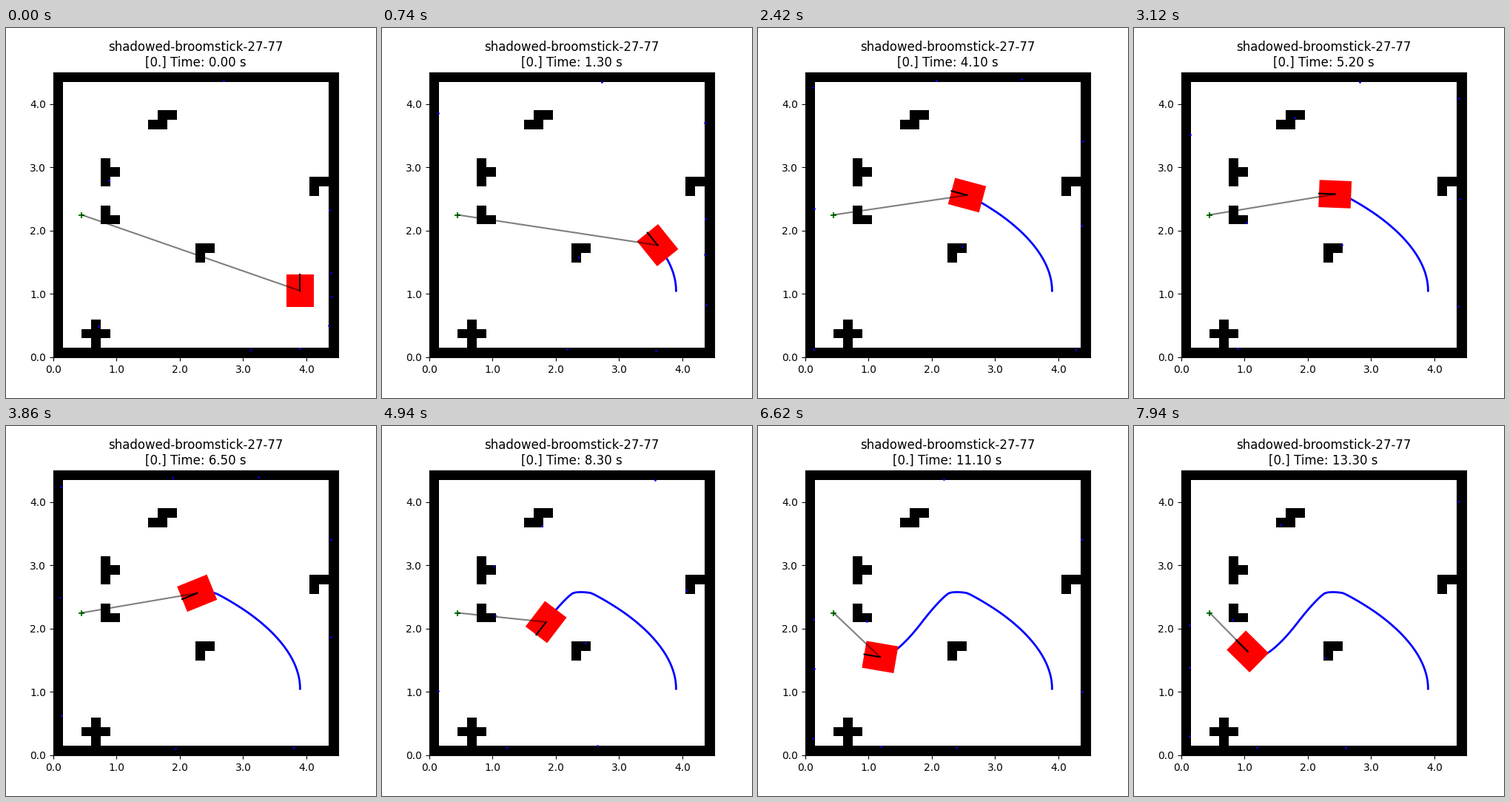
A matplotlib script for the animation above (8 s loop, 500x500 px).

```python
import numpy as np
import matplotlib.pyplot as plt
from matplotlib.animation import FuncAnimation

CELL, N = 0.15, 30
SIZE = CELL * N
GOAL = np.array([0.45, 2.25])
LENGTH, WIDTH = 0.508, 0.43
DT, STEPS = 0.1, 134

# key poses: time, x, y, heading in degrees, speed
POSES = np.array([
    (0.0, 3.90, 1.05, 90, 0.62),
    (2.5, 3.10, 2.238, 144.3, 0.50),
    (4.1, 2.557, 2.561, 165, 0.08),
    (6.5, 2.273, 2.561, 202, 0.09),
    (8.3, 1.846, 2.105, 232.6, 0.55),
    (11.1, 1.183, 1.552, 170.3, 0.12),
    (13.3, 1.051, 1.640, 135.4, 0.07),
])


def make_grid():
    grid = np.zeros((N, N))
    grid[[0, -1], :] = grid[:, [0, -1]] = 1
    grid[24, 10:12] = grid[25, 11:13] = 1
    grid[18:21, 5] = grid[14:16, 5] = 1
    grid[[19, 14], 6] = 1
    grid[1:4, 4] = grid[2, 3:6] = 1
    for row, col in [(10, 15), (17, 27)]:
        grid[row:row + 2, col] = grid[row + 1, col + 1] = 1
    return grid


def unit(angle):
    return np.array([np.cos(angle), np.sin(angle)])


def drive(t):
    """Position and heading on a cubic Hermite curve through the key poses."""
    k = np.clip(np.searchsorted(POSES[:, 0], t, side="right") - 1, 0, len(POSES) - 2)
    a, b = POSES[k], POSES[k + 1]
    span = b[0] - a[0]
    u = (t - a[0]) / span
    p, q = a[1:3], b[1:3]
    v, w = (s[4] * span * unit(np.radians(s[3])) for s in (a, b))
    c2 = 3 * (q - p) - 2 * v - w
    c3 = 2 * (p - q) + v + w
    dx, dy = v + 2 * c2 * u + 3 * c3 * u**2
    return p + u * (v + u * (c2 + u * c3)), np.arctan2(dy, dx)


def scan(pos, angle):
    """First occupied sample along each of nine rays."""
    reach = np.linspace(0, 5, 100)
    hits = []
    for a in angle + np.linspace(-np.pi, np.pi, 10)[:-1]:
        pts = pos + reach[:, None] * unit(a)
        col, row = np.clip((pts / CELL).astype(int), 0, N - 1).T
        hits.append(pts[np.argmax(grid[row, col] > 0)])
    return np.array(hits)


def outline(pos, angle):
    fwd, side = unit(angle) * LENGTH / 2, unit(angle + np.pi / 2) * WIDTH / 2
    return [pos + fwd + side, pos + fwd - side, pos - fwd - side, pos - fwd + side]


def caption(n):
    return f"shadowed-broomstick-27-77\n[0.] Time: {n * DT:.2f} s"


grid = make_grid()
track = [drive(n * DT) for n in range(STEPS)]
path = np.array([pos for pos, _ in track])
scans = [scan(*pose) for pose in track]

fig, ax = plt.subplots(figsize=(5, 5), dpi=100)
ax.imshow(grid, cmap="gray_r", origin="lower", extent=(0, SIZE, 0, SIZE),
          interpolation="nearest")
ticks = range(5)
labels = [f"{v:.1f}" for v in ticks]
ax.set_xticks(ticks, labels)
ax.set_yticks(ticks, labels)
title = ax.set_title(caption(0))

trail, = ax.plot([], [], "b-", lw=2, zorder=2)
body, = ax.fill([0] * 4, [0] * 4, color="red", lw=0, zorder=2.5)
ax.scatter(*GOAL, marker="+", s=36, color="green", zorder=3)
nose, = ax.plot([], [], "k-", lw=1.5, zorder=3)
sight, = ax.plot([], [], "k-", lw=1.5, alpha=0.5, zorder=3)
dots = ax.scatter(*scans[0].T, s=1, color="blue", zorder=3)
ax.set_xlim(0, SIZE)
ax.set_ylim(0, SIZE)


def update(i):
    # even steps hold for 20 ms, odd steps for 100 ms
    n = 2 * (i // 6) + (i % 6 > 0)
    pos, angle = track[n]
    trail.set_data(*path[:n + 1].T)
    body.set_xy(outline(pos, angle))
    nose.set_data(*np.array([pos, pos + unit(angle) * LENGTH / 2]).T)
    sight.set_data(*np.array([pos, GOAL]).T)
    dots.set_offsets(scans[n])
    title.set_text(caption(n))
    return trail, body, nose, sight, dots, title


anim = FuncAnimation(fig, update, frames=400, interval=20, repeat=True,
                     repeat_delay=0)
plt.show()
```
